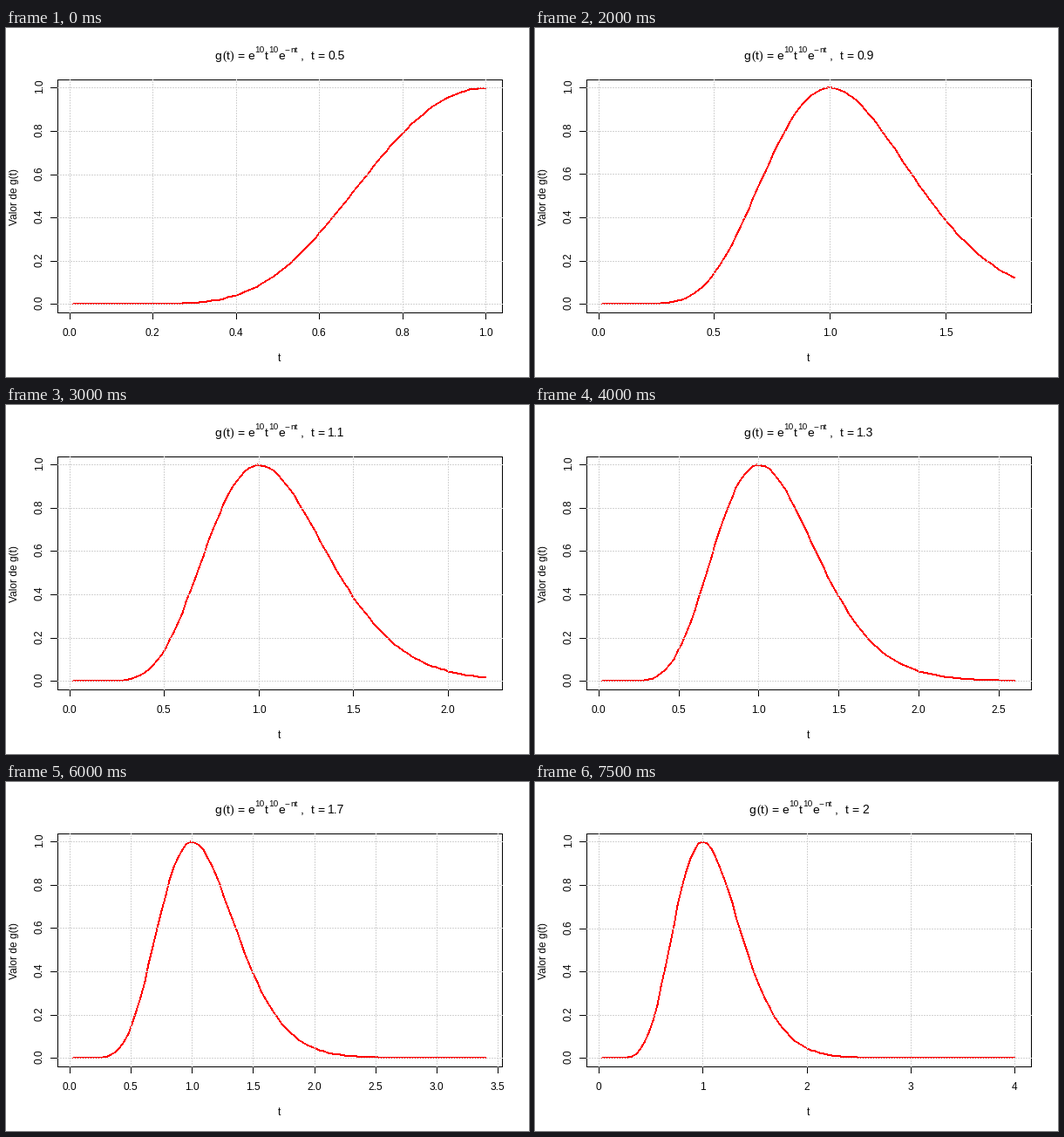
These frames come from a looping animation (600 by 400 pixels, 8 s). A matplotlib script:

```python
import numpy as np
import matplotlib.pyplot as plt
from matplotlib.animation import FuncAnimation

plt.rcParams.update({
    "text.hinting": "native",
    "text.hinting_factor": 8,
    "lines.antialiased": False,
    "path.simplify": False,
    "path.snap": False,
})

WIDTH, HEIGHT, DPI = 600, 400, 100
PT = 72 / DPI                       # points per pixel
LINE = 14.4                         # height of one margin line
LEFT, RIGHT = 4.1 * LINE, WIDTH - 2.1 * LINE
TOP, BOTTOM = 4.1 * LINE, HEIGHT - 5.1 * LINE
SANS, SERIF = "Liberation Sans", "Liberation Serif"

# Title runs: offset from the left edge, baseline, size, font, text
TITLE = [
    (0, 36, 14, SANS, "g"), (9, 36, 14, SERIF, "("),
    (14, 36, 14, SANS, "t"), (18, 36, 14, SERIF, ")"),
    (26, 36, 14, SANS, "="), (38, 36, 14, SANS, "e"),
    (46, 28, 10, SANS, "10"), (58, 36, 14, SANS, "t"),
    (62, 28, 10, SANS, "10"), (73, 36, 14, SANS, "e"),
    (81, 28, 10, SANS, "\u2212"), (87, 28, 10, SANS, "nt"),
    (99, 36, 14, SANS, ","), (111, 36, 14, SANS, "t"),
    (118, 36, 14, SANS, "="),
]

fig = plt.figure(figsize=(WIDTH / DPI, HEIGHT / DPI), dpi=DPI, facecolor="white")
ax = fig.add_axes([0, 0, 1, 1])


def write(x, y, text, size=12, font=SANS, rotation=0):
    ax.text(x, y, text, fontsize=size * PT, family=font, rotation=rotation,
            rotation_mode="anchor", ha="left", va="baseline", color="black")


def stroke(xs, ys, color="black", **style):
    ax.plot(xs, ys, color=color, lw=PT, **style)


def dotted(xs, ys):
    stroke(xs, ys, "lightgray", ls=(0, (2, 2)), dash_capstyle="butt", zorder=5)


def pen(xs, ys, radius=1):
    """Hard-edged round pen along a polyline, its vertices on pixel centres."""
    layer = np.zeros((HEIGHT, WIDTH, 4))
    layer[..., 0] = 1
    for x0, y0, x1, y1 in zip(xs, ys, xs[1:], ys[1:]):
        low, high = sorted((int(y0), int(y1)))
        rows, cols = np.mgrid[low - 2:high + 3, int(x0) - 2:int(x1) + 3]
        dx, dy = x1 - x0, y1 - y0
        u, v = cols - x0 + 0.01, rows - y0 + 0.01   # ties go up and left
        along = np.clip((u * dx + v * dy) / (dx * dx + dy * dy), 0, 1)
        inside = np.hypot(u - along * dx, v - along * dy) < radius
        layer[rows[inside], cols[inside], 3] = 1
    ax.imshow(layer, extent=(0, WIDTH, HEIGHT, 0), aspect="auto",
              interpolation="nearest", zorder=2)


def tick_step(span):
    """Round step for about five intervals."""
    cell = span / 5
    unit = base = 10 ** np.floor(np.log10(cell))
    for factor, bias in ((2, 0.8), (5, 1.7), (10, 0.8)):
        if factor * base - cell >= bias * (cell - unit):
            break
        unit = factor * base
    return unit


def draw(frame):
    ax.clear()

    t = (5 + frame) / 10
    x = 2 * t * np.arange(1, 101) / 100
    g = np.exp(10 - 10 * x) * x ** 10
    pad_x = 0.04 * (x[-1] - x[0])
    x_low, x_high = x[0] - pad_x, x[-1] + pad_x
    y_low, y_high = -0.04 * g.max(), 1.04 * g.max()

    def to_px(v):
        return np.floor(LEFT + (RIGHT - LEFT) * (v - x_low) / (x_high - x_low))

    def to_py(v):
        return np.floor(BOTTOM - (BOTTOM - TOP) * (v - y_low) / (y_high - y_low))

    pen(to_px(x), to_py(g))
    ax.set(xlim=(0, WIDTH), ylim=(HEIGHT, 0))
    ax.axis("off")

    left, right, top, bottom = (int(v) + 0.5 for v in (LEFT, RIGHT, TOP, BOTTOM))
    stroke([left, right, right, left, left], [bottom, bottom, top, top, bottom],
           solid_joinstyle="miter", solid_capstyle="projecting", zorder=3)

    step = tick_step(x_high - x_low)
    whole = step > 0.9
    for k in range(int(x_high / step + 1e-9) + 1):
        px = to_px(k * step)
        stroke([px + 0.5] * 2, [bottom, 334], solid_capstyle="butt", zorder=4)
        dotted([px + 0.5] * 2, [bottom + 0.5, top])
        write(px - (3.34 if whole else 8.34), 353,
              f"{k * step:.{0 if whole else 1}f}")

    for k in range(6):
        py = to_py(k / 5)
        stroke([51, left], [py + 0.5] * 2, solid_capstyle="butt", zorder=4)
        dotted([left - 0.5, right], [py + 0.5] * 2)
        write(42, py + 7, f"{k / 5:.1f}", rotation=90)

    write(312, 382, "t")
    write(13, 226, "Valor de g(t)", rotation=90)

    value = f"{t:g}"
    start = 239 if "." in value else 245
    for dx, y, size, font, text in TITLE + [(130, 36, 14, SANS, value)]:
        write(start + dx, y, text, size, font)
    return []


anim = FuncAnimation(fig, draw, frames=16, interval=500, init_func=lambda: [],
                     repeat=True, repeat_delay=0)
plt.show()
```
